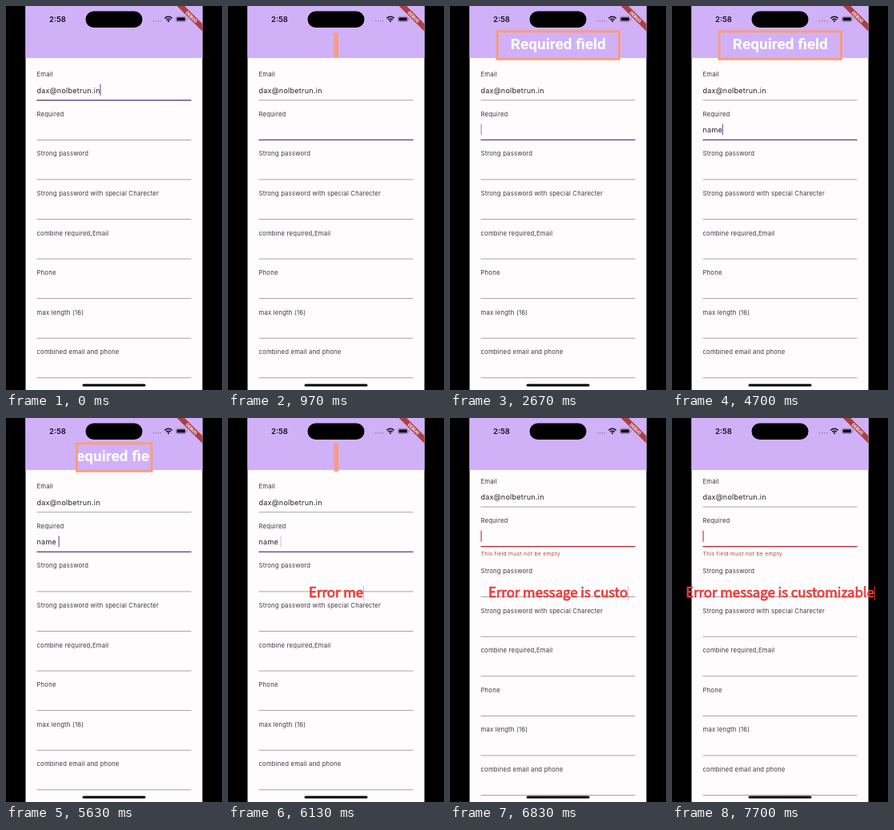
These frames come from a looping animation (270 by 480 pixels, 8000 ms). An HTML page:

```html
<!DOCTYPE html>
<html lang="en">
<head>
<meta charset="utf-8">
<title>Form validation</title>
<style>
  html, body { margin: 0; width: 100%; height: 100%; overflow: hidden; background: #000; }
  svg { display: block; width: 100vw; height: 100vh; }
  text { white-space: pre; font-family: Inter, Roboto, sans-serif; }
  .label { font-size: 7.7px; letter-spacing: .2px; fill: #3c3640; }
  .value { font-size: 9px; letter-spacing: .28px; fill: #221e26; }
  .hint { font-size: 6.75px; letter-spacing: .3px; fill: #b8423a; }
  .clock { font-size: 9.5px; font-weight: 600; fill: #151018; }
  .debug { font: 700 5.6px Roboto, sans-serif; fill: #fff; text-anchor: middle; }
  .title { font: 700 19px Roboto, sans-serif; fill: #fff; text-anchor: middle; }
  .caption {
    font: 400 16.8px "Noto Sans CJK JP", "Noto Sans CJK SC", "Noto Sans CJK", "Noto Sans", sans-serif;
    fill: #ee3b38; stroke: #ee3b38; stroke-width: .75; text-anchor: middle;
  }
</style>
</head>
<body>
<svg id="stage" viewBox="0 0 270 480">
  <defs>
    <clipPath id="screen"><rect x="24.5" width="221" height="480"/></clipPath>
    <clipPath id="boxClip"><rect id="boxInner"/></clipPath>
  </defs>
  <rect width="270" height="480" fill="#000"/>
  <g clip-path="url(#screen)">
    <rect x="24" width="222" height="480" fill="#fffcfd"/>
    <rect x="24" width="222" height="65" fill="#d0b1f8"/>
    <g id="form"></g>
    <rect x="95.5" y="472.6" width="79" height="3" rx="1.5" fill="#000"/>
    <text class="clock" x="54" y="20">2:58</text>
    <rect x="99.5" y="6.5" width="71" height="20.5" rx="10.2" fill="#000"/>
    <g fill="#8d78a8">
      <circle cx="184.5" cy="18.8" r=".8"/><circle cx="187.5" cy="18.8" r=".8"/>
      <circle cx="190.5" cy="18.8" r=".8"/><circle cx="193.5" cy="18.8" r=".8"/>
    </g>
    <g fill="none" stroke="#151018" stroke-width="1.5">
      <path d="M198.3 15.4Q203 11.2 207.7 15.4M200.2 17.4Q203 15 205.8 17.4"/>
      <circle cx="203" cy="19" r=".4"/>
    </g>
    <rect x="212.5" y="13.2" width="12.4" height="6.4" rx="2" fill="none" stroke="#7d6a94" stroke-width=".6"/>
    <rect x="213.5" y="14.2" width="10.4" height="4.4" rx="1.2" fill="#151018"/>
    <rect x="225.7" y="15.3" width=".8" height="2.2" fill="#7d6a94"/>
    <g transform="translate(245.5 0) rotate(45)">
      <rect x="-24" y="15.75" width="48" height="6.75" fill="#ab3f47"/>
      <text class="debug" y="21.2">DEBUG</text>
    </g>
  </g>
  <g id="banner">
    <text class="title" x="135.3" y="54.3" clip-path="url(#boxClip)">Required field</text>
    <path id="boxFrame" fill="#fa9d7c" fill-rule="evenodd"/>
  </g>
  <text class="caption" id="caption" x="135" y="223.6"></text>
  <rect id="captionCaret" y="210" width="1" height="18" fill="#d8402c"/>
</svg>
<script>
const LOOP = 8000, PITCH = 49.57, LEFT = 38.5;
const LABELS = ["Email", "Required", "Strong password", "Strong password with special Charecter",
  "combine required,Email", "Phone", "max length (16)", "combined email and phone"];
const EMAIL = "dax@nolbetrun.in";
const MESSAGE = "Error message is customizable";
const TYPED = "name ";
const KEYS = [3470, 3500, 3670, 3730, 5560];
const DELETES = [6200, 6275, 6350, 6425, 6500];
const ERROR_AT = 6500;

const $ = id => document.getElementById(id);
const ramp = (t, from, length) => Math.min(1, Math.max(0, (t - from) / length));
const grow = p => 1 - (1 - p) ** 1.45;
const set = (el, attrs) => { for (const k in attrs) el.setAttribute(k, attrs[k]); };
const write = (el, text) => { if (el.textContent !== text) el.textContent = text; };

function add(parent, tag, attrs, text = "") {
  const el = document.createElementNS("http://www.w3.org/2000/svg", tag);
  set(el, attrs);
  el.textContent = text;
  return parent.appendChild(el);
}

const rows = LABELS.map((label, i) => {
  const y = 85.5 + PITCH * i;
  const g = add($("form"), "g", {});
  add(g, "text", { class: "label", x: LEFT, y: y + 2.8 }, label);
  const line = (color, h) =>
    add(g, "rect", { x: LEFT, y: y + 32.3 - h / 2, width: 193, height: h, fill: color });
  return { g, y, idle: line("#938c90", .8), focus: line("#5a4889", 1.3) };
});

const [email, required] = rows;
function addInput(row, text) {
  row.value = add(row.g, "text", { class: "value", x: LEFT, y: row.y + 23 }, text);
  row.caret = add(row.g, "rect", { y: row.y + 12.3, width: 1.1, height: 14, fill: "#6750a4" });
}
addInput(email, EMAIL);
addInput(required, "");
const alarm = add(required.g, "rect", { x: LEFT, y: required.y + 31.6, width: 193, height: 1.4, fill: "#b8323f" });
const hint = add(required.g, "text", { class: "hint", x: LEFT, y: required.y + 44 }, "This field must not be empty");

// Caret stays on after a key press, then fades out and back in.
function blink(since) {
  const t = since < 0 ? 0 : since % 970;
  return 1 - ramp(t, 510, 90) + ramp(t, 850, 110);
}

function drawForm(t) {
  const focus = ramp(t, 50, 170);
  const error = ramp(t, ERROR_AT, 170);
  rows.forEach((row, i) => {
    set(row.g, { transform: `translate(0 ${6.7 * error * (i < 2 ? -1 : 1)})` });
    set(row.focus, { opacity: i === 0 ? 1 - focus : i === 1 ? focus * (1 - error) : 0 });
  });
  set(alarm, { opacity: error });
  set(hint, { opacity: error });

  const past = times => times.filter(at => t >= at).length;
  write(required.value, TYPED.slice(0, past(KEYS) - past(DELETES)));
  const lastKey = Math.max(190, ...KEYS.concat(DELETES).filter(at => t >= at));
  const caretX = row => LEFT + (row.value.textContent ? row.value.getComputedTextLength() - .4 : 0);
  set(email.caret, { x: caretX(email), opacity: t < 50 ? 1 : 0 });
  set(required.caret, {
    x: caretX(required),
    opacity: t < 50 ? 0 : blink(t - lastKey),
    fill: t < ERROR_AT ? "#6750a4" : "#b8323f"
  });
}

// Opens as a bar from the middle, then widens; closes the same way backwards.
function drawBanner(t) {
  const high = t < 4000 ? grow(ramp(t, 400, 835)) : grow(1 - ramp(t, 6035, 800));
  const wide = t < 4000 ? grow(ramp(t, 1237, 833)) : grow(1 - ramp(t, 5190, 840));
  const h = 37.4 * high, w = 5.5 + 149.9 * wide, edge = 3;
  const x = 135.2 - w / 2, y = 49 - h / 2;
  const iw = Math.max(0, w - 2 * edge), ih = Math.max(0, h - 2 * edge);
  const box = (x, y, w, h) => `M${x} ${y}h${w}v${h}h${-w}z`;
  const hole = iw && ih ? box(x + edge, y + edge, iw, ih) : "";
  set($("boxFrame"), { d: box(x, y, w, h) + hole });
  set($("boxInner"), { x: x + edge, y: y + edge, width: iw, height: ih });
  set($("banner"), { visibility: h > .7 ? "visible" : "hidden" });
}

function drawCaption(t) {
  const count = Math.max(0, Math.min(MESSAGE.length, Math.floor((t - 5725) / 50)));
  const el = $("caption");
  write(el, MESSAGE.slice(0, count));
  const half = count ? el.getComputedTextLength() / 2 : 0;
  const typing = count > 0 && t < 7200;
  set($("captionCaret"), { x: 135 + half, opacity: typing ? .4 : t >= 7700 ? 1 : 0 });
}

function draw(t) {
  drawForm(t);
  drawBanner(t);
  drawCaption(t);
}

const start = performance.now();
function tick() {
  draw((performance.now() - start) % LOOP);
  requestAnimationFrame(tick);
}
tick();
</script>
</body>
</html>
```
